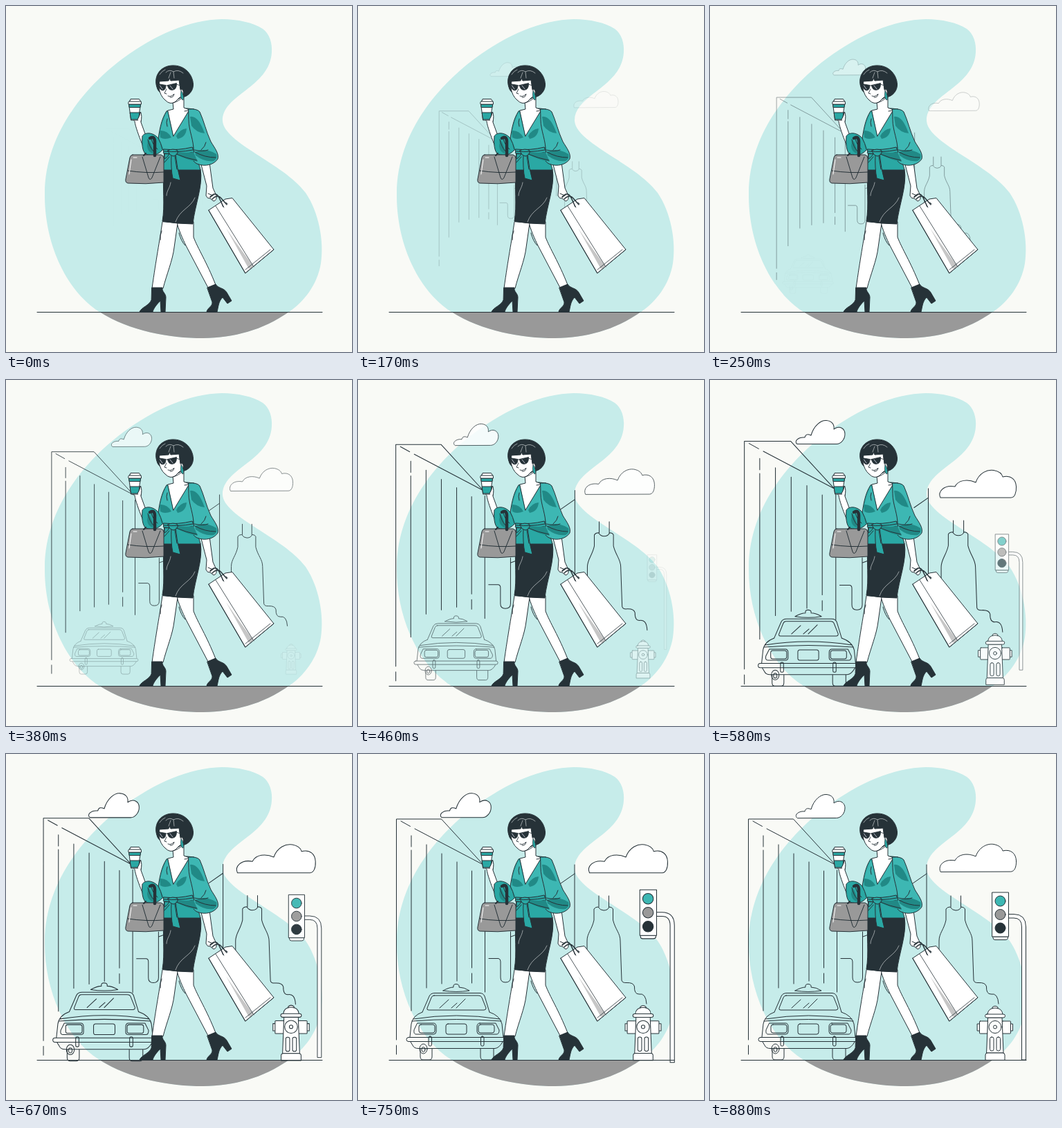
An HTML page without scripts for the animation above (930 ms loop, 500 px wide and 500 px high).

```html
<!DOCTYPE html>
<html lang="en">
<head>
<meta charset="utf-8">
<title>City walk</title>
<style>
  /* Pop progress: drives scale and opacity together, may overshoot 1 */
  @property --p { syntax: '<number>'; inherits: false; initial-value: 1; }

  :root { --ink: #263238; --teal: #2aa8a4; --light: #3db7b3; --shade: #218986; --grey: #999; }
  html, body { margin: 0; width: 100%; height: 100%; overflow: hidden; background: #f9faf6; }
  svg { display: block; width: 100%; height: 100%; }
  .line { fill: none; stroke: var(--ink); stroke-linecap: round; stroke-linejoin: round; }
  .white { fill: #fff; }
  .teal { fill: var(--teal); }
  .bright { fill: var(--light); }
  .shade { fill: var(--shade); stroke: none; }
  .grey { fill: var(--grey); }
  .ink { fill: var(--ink); }
  .thin { stroke: #c9cfd0; stroke-width: .7; fill: none; }

  .pop {
    opacity: var(--p);
    transform: scale(calc(.5 + .5 * var(--p)));
    animation: 930ms cubic-bezier(.36, -.01, .5, 1.38) infinite;
  }
  .city { animation-name: city; transform-origin: 236px 263px; animation-timing-function: cubic-bezier(.336, .144, .499, 1.361); }
  .clouds { animation-name: clouds; transform-origin: 283.5px 114px; animation-timing-function: cubic-bezier(.354, .034, .5, 1.374); }
  .car { animation-name: car; transform-origin: 141.5px 387px; }
  .hydrant { animation-name: hydrant; transform-origin: 412px 403px; }
  .light { animation-name: light; transform-origin: 432px 321px; }

  @keyframes city { 0% { --p: .013 } 73.9%, to { --p: 1 } }
  @keyframes clouds { 0% { --p: 0 } 92.5%, to { --p: 1 } }
  @keyframes car { 0%, 21.5% { --p: 0 } 80.6%, to { --p: 1 } }
  @keyframes hydrant { 0%, 31.7% { --p: 0 } 83.9%, to { --p: 1 } }
  @keyframes light { 0%, 39.8% { --p: 0 } 91.4%, to { --p: 1 } }
</style>
</head>
<body>
<svg viewBox="0 0 500 500">
  <defs>
    <path id="blob" d="M312 19C335 19 357 24 371 33C381 40 385 54 384 67C381 118 312 128 313 166C315 198 401 227 433 270C452 298 460 340 455 372C450 403 430 428 409 442C370 469 330 479 285 480C235 480 180 470 135 442C85 410 55 340 56 270C57 180 120 112 170 75C215 42 265 20 312 19Z"/>
    <clipPath id="below"><path d="M0 442.500H500V500H0Z"/></clipPath>
  </defs>
  <use href="#blob" fill="#c6ecea"/>
  <use href="#blob" class="grey" clip-path="url(#below)"/>

  <g class="line pop city">
    <path d="M55.500 434V421M55.500 413V94H120.500L181 160M62 97L75.500 104.500M82 108L181 160"/>
    <path d="M77 118V134M77 139V371M99 131V338M121 144V332M143 156V328M164.500 169V309M164.500 317V331M183.500 168V344"/>
    <path d="M189 295.500H203Q206 296 206 300V323Q206 330 213 330Q220.500 330 220.500 323V257M221 264L229 261"/>
    <path d="M313 160V280M313 173L293 187M348 205V221M362.500 205V221"/>
    <path d="M331 310V270C331 259 338 254 341 240V224Q343 221 347 221Q350 226 355 226Q361 226 363 221Q367 221 368.500 224V240C372 254 379 259 379 270L381 327Q382 331 388 330.500Q398 330 399.500 336Q399 347 406 347Q416 345 417 361"/>
  </g>

  <g class="line pop clouds">
    <path class="white" d="M126 92.500C121 89 127 82 137 83C138 78 142 78 146 80C150 66 160 58 168 58.500C176 59 180 64 179 71C187 65 195 70 195 78C195 86 189 92.500 183 92.500Z"/>
    <path class="white" d="M333 170C329 162 337 151 354 154C359 144 373 143 384 148C389 134 401 129 410 130.500C418 132 422 136 423 140C435 137 442 144 442.500 154C443 163 440 170 435 170Z"/>
  </g>

  <g class="line pop car">
    <path d="M123 342Q132 337 138 337Q137 332.500 142 332.500Q147 333 146 337Q153 337 161 342Q142 345 123 342Z"/>
    <path d="M93 373L103 350Q105 345.500 111 345.500H176Q181 345.500 183 350L190 373"/>
    <path d="M110 349H174Q178 349 179 352L185 367Q185 370 182 370H102Q99 370 100 367L106 352Q107 349 110 349ZM118 367L131 355M135 367L143 360M142 367L155 354"/>
    <path d="M93 373Q79 378 77 390L75 409M190 373Q205 378 208 390L210 409M80 383Q142 373 205 383M78 386Q142 381 207 386"/>
    <path d="M86 389H109Q113 389 113 394V401Q113 405 109 405H84Q80 405 81 399ZM176 389H199L204 399Q204 405 200 405H176Q172 405 172 401V394Q172 389 176 389Z"/>
    <rect x="88" y="391" width="23" height="12" rx="3"/>
    <rect x="174" y="391" width="23" height="12" rx="3"/>
    <rect x="127" y="390" width="30" height="15" rx="3"/>
    <rect x="70" y="409.500" width="143" height="6" rx="3"/>
    <rect x="102" y="408" width="4.500" height="14" rx="2"/>
    <rect x="177.500" y="408" width="4.500" height="14" rx="2"/>
    <path d="M76 416L79 421Q81 425.500 87 425.500H198Q204 425 209 416"/>
    <path d="M90 426V437Q90 442 94 442H103Q107 442 107 437V426M177 426V437Q177 442 181 442H192Q196 442 196 437V426"/>
    <ellipse cx="94.500" cy="426" rx="5.500" ry="7"/>
    <ellipse cx="94.500" cy="427" rx="2.500" ry="3.500"/>
  </g>

  <g class="line white pop hydrant">
    <g class="white">
      <path d="M408 368V366Q412 362.500 416 366V368M401 376Q402 367 412 367Q422 367 423 376"/>
      <rect x="386.500" y="390" width="4" height="10"/>
      <rect x="433.500" y="390" width="4" height="10"/>
      <rect x="389.500" y="386" width="12.500" height="18" rx="1"/>
      <rect x="422" y="386" width="12.500" height="18" rx="1"/>
      <path d="M402 381H422L424 432H400Z"/>
      <rect x="397.500" y="376" width="29" height="5" rx="2.500"/>
      <circle cx="412" cy="394.500" r="9"/>
      <circle cx="412" cy="394.500" r="2.500"/>
      <rect x="404.500" y="409" width="5.500" height="20" rx="2.500"/>
      <rect x="414" y="409" width="5.500" height="20" rx="2.500"/>
      <path d="M398 442V435Q398 432 401 432H423Q426 432 426 435V442Z"/>
    </g>
  </g>

  <g class="line pop light">
    <path class="white" d="M431 231.500H439Q456.500 231.500 456.500 250V442H450.500V250Q450.500 237 439 237H431Z"/>
    <path class="white" d="M409 264H430.500V266Q430 268.500 427 268.500H412Q409 268.500 409 266Z"/>
    <path class="white" d="M408 200H431.500V264H408Z"/>
    <circle class="bright" cx="419.500" cy="212.500" r="7.500"/>
    <circle class="grey" cx="419.500" cy="232" r="7.500"/>
    <circle class="ink" cx="419.500" cy="251.500" r="7.500"/>
  </g>

  <path class="line" d="M45 442.500H457"/>

  <g class="line">
    <!-- legs and boots -->
    <path class="white" d="M247 314C252 330 257 340 262 350L292 407L303 403C290 370 277 350 271 334V312Z"/>
    <path class="white" d="M226 312C222 340 217 365 211 408H227C232 388 241 367 243 349L248 314Z"/>
    <path d="M250 328Q253 340 259 346M225 325Q222 332 223 338"/>
    <path class="ink" d="M211 407H226C225 413 231 415 231 421L230 442H224L223 426C216 433 213 438 212 442H193C196 435 207 433 210 425Z"/>
    <path class="ink" d="M291 407L303 402C306 408 315 407 319 414L326 426L320 430L313 421C307 427 307 434 305 442H290C291 436 299 434 298 428Z"/>
    <!-- skirt -->
    <path class="ink" d="M228 236H281C285 260 273 287 270 315Q248 315 226 311C230 288 226 262 228 236Z"/>
    <path class="thin" d="M238 255C237 263 232 267 232 274M273 277C267 292 251 294 245 312"/>

    <!-- shopping bag and arm -->
    <path class="white" d="M282 229L290 260L289 274Q291 279 295 278L300 282Q305 281 304 274L299 263L294 226Z"/>
    <path class="white" d="M293 295L317 279L327 277.500L387 352L346 386Z"/>
    <path fill="#c6c6c6" stroke="none" d="M318 321L351 380L358 377L331 340Z"/>
    <path d="M303 289L358 377M293 295L346 386L387 352M346 381L382 352" stroke-width=".8"/>
    <path d="M295 276Q303 267 308 277L314 290M298 279Q306 271 312 279L319 287" stroke-width="1.500"/>
    <path d="M292 271L299 274M295 277L301 272M313 289L315 291M318 284L320 286"/>

    <!-- raised arm and cup -->
    <path class="white" d="M182 162Q179 155 186 158L193 153Q197 160 195 168L203 190L197 200C192 188 187 174 186 167Z"/>
    <path class="white" d="M178 142H194.500L191 165H181Z"/>
    <path class="teal" d="M178 142H194.500L194 146.500H178.500Z"/>
    <path class="teal" d="M179.500 154H193L191.500 164H181Z"/>
    <path class="white" d="M179 137L180 134.500H192.500L194 137Q196 138 195.500 142H177Q176 138 179 137ZM178 138H195"/>
    <path class="white" d="M190 164Q193 160 194.500 153Q197 159 195 167"/>

    <!-- torso -->
    <path class="teal" d="M232 152C224 164 222 180 220 191C211 181 200 183 197 188C196 199 197 210 202 214C212 217 220 215 226 208L229 207L227 237H281C278 224 273 214 271 205L272 149L262 148Z"/>
    <path class="bright" stroke="none" d="M233 153C226 165 223 180 221 191L228 207Q250 209 270 204L271 149L264 150L242 188Z"/>
    <path class="white" d="M234 151L242 149L241 139L257 130V147L265 150L242 188Z"/>
    <path d="M258 152Q262 152 265 150"/>
    <path class="shade" d="M222 180Q233 179 239 190Q229 194 223 190ZM246 188Q251 178 261 177Q260 190 248 192ZM205 193Q212 199 212 213Q205 211 204 203Z"/>
    <path d="M220 191Q224 198 226 207M205 193Q207 203 213 210M210 191Q211 200 219 207M233 163Q231 168 233 174"/>
    <path class="bright" d="M264 149Q276 148 280 153C286 166 289 181 296 196C302 206 308 213 306 221C301 229 288 233 276 228C270 225 268 220 271 211C272 195 264 180 264 165Z"/>
    <path class="shade" d="M266 160Q278 158 287 184Q275 183 268 173ZM273 211Q287 204 304 214Q306 221 300 224Q287 226 274 216Z"/>
    <path d="M272 208Q285 211 292 208M273 211Q287 219 303 219M282 208Q288 203 289 197"/>
    <!-- sash -->
    <path class="teal" d="M228 207Q250 209 269 204L272 211Q254 216 228 213Z"/>
    <path class="shade" d="M248 211Q262 213 271 211L277 225Q259 222 246 214Z"/>
    <path class="teal" d="M239 214Q238 235 241 249L252 252Q247 234 245 214ZM236 214Q232 220 229 221L229 214Z"/>
    <path class="teal" d="M234 209Q241 205 248 209Q249 215 242 217Q236 216 234 209Z"/>
    <path d="M246 214Q260 220 276 223M228 210Q249 212 270 208M244 217L247 236M229 226L236 218"/>

    <!-- handbag -->
    <path class="grey" d="M183 215H224Q228 216 228 220V255Q202 258 176 256Q172 255 173 250L179 219Q180 215 183 215Z"/>
    <path d="M176 238Q202 242 228 240M197 218L206 248Q208 253 211 248L223 218"/>
    <path d="M181 222L178 243M184 219H189" style="stroke: #fff"/>
    <path d="M208 191Q214 187 215 195V216" stroke-width="4.500"/>
    <path d="M199 216L202 213" stroke-width="2"/>

    <!-- head -->
    <path class="ink" d="M219 120C212 104 221 87 240 86C259 85 270 100 270.500 113C271 122 264 131 254 132L230 128Q221 126 219 120Z"/>
    <path class="white" d="M222 109L235 108L236 104L238 108L250 107L252 121Q257 119 256 127Q255 132 251 132L244 139Q237 143 230 136Q223 130 221 119Z"/>
    <path class="ink" d="M219.500 112.500L231 114.500Q231 122 226 122Q221 121 219.500 112.500ZM233.500 114.500L246.500 111.500Q247 121 240 121.500Q234 121 233.500 114.500ZM231 115H234M246 113L252 115" stroke-width=".8"/>
    <path d="M222.500 115L226 120M237 115L241 120" style="stroke: #dde" stroke-width=".8"/>
    <path d="M232 120L229 126L232 127M234 130Q239 132 243 127Q242 133 237 132M241 140Q250 138 256 131" stroke-width=".9"/>
    <path class="teal" d="M253 122Q258 130 256 136Q251 135 253 122Z" stroke-width=".7"/>
    <path class="thin" d="M231 96Q236 91 242 95Q249 91 256 97M238 96L235 104M242 95L243 104M222 99Q225 94 230 92"/>
  </g>
</svg>
</body>
</html>
```
